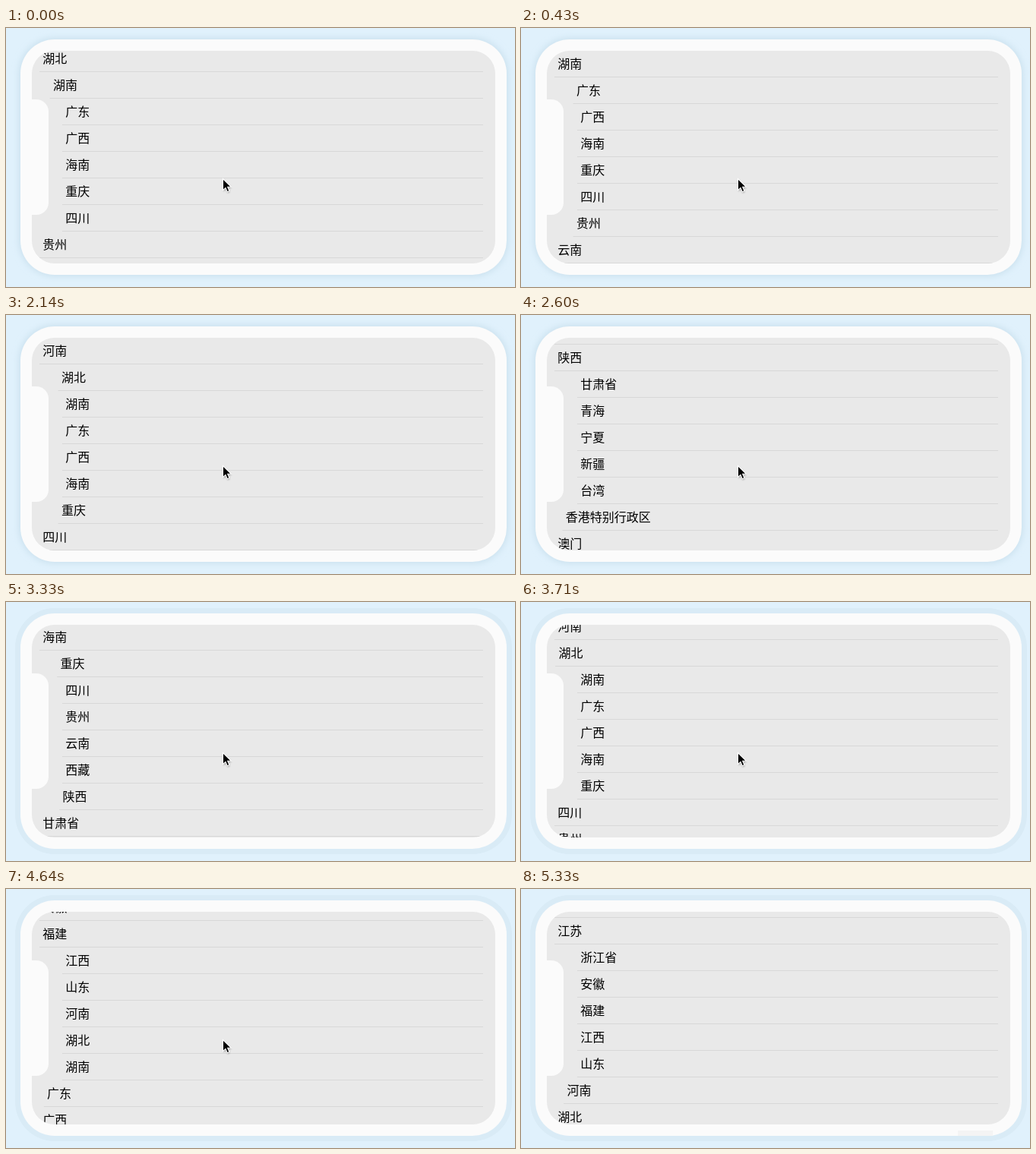
These frames come from a looping animation (670x341 px, 5710 ms). An HTML page:

```html
<!DOCTYPE html>
<html lang="zh-CN">
<head>
<meta charset="utf-8">
<title>List scrolling around a notch</title>
<style>
  html, body { margin: 0; width: 100%; height: 100%; overflow: hidden; background: #e0f1fc; }
  svg { display: block; width: 670px; height: 341px; }
  text { font: 16px "Noto Sans CJK SC", "Noto Sans CJK", sans-serif; fill: #000; }
</style>
</head>
<body>
<svg viewBox="0 0 670 341">
  <defs>
    <clipPath id="screen"><rect x="34" y="30" width="610" height="280" rx="30"/></clipPath>
    <filter id="soft" x="-10%" y="-10%" width="120%" height="120%"><feGaussianBlur stdDeviation="4.5"/></filter>
    <filter id="tiny" x="-50%" y="-50%" width="200%" height="200%"><feGaussianBlur stdDeviation="1"/></filter>
    <path id="arrow" d="M0 0V15.2L3.5 11.9L5.8 17.2L8.5 16L6.2 10.8H11Z"/>
  </defs>
  <rect id="glow" x="17" y="13" width="644" height="314" rx="47" fill="#cbe1ee" filter="url(#soft)"/>
  <rect id="ring" x="12" y="8" width="654" height="324" rx="52" fill="#d9ebf6"/>
  <rect x="19" y="15" width="640" height="310" rx="45" fill="#fbfbfb"/>
  <g clip-path="url(#screen)">
    <rect x="34" y="30" width="610" height="280" fill="#e9e9e9"/>
    <g id="list"></g>
    <path d="M34 94H40A16 16 0 0 1 56 110V230A16 16 0 0 1 40 246H34Z" fill="#fbfbfb"/>
  </g>
  <rect id="patch" x="575" y="318" width="46" height="7" fill="#f4f4f4"/>
  <g id="cursor">
    <use href="#arrow" x="0.5" y="1.5" opacity=".35" filter="url(#tiny)"/>
    <use href="#arrow" fill="#000" stroke="#fff" stroke-width="1.1"/>
  </g>
</svg>
<script>
const LOOP = 5710, PITCH = 35;
const names = ("上海 江苏 浙江省 安徽 福建 江西 山东 河南 湖北 湖南 广东 广西 海南 重庆 四川 " +
  "贵州 云南 西藏 陕西 甘肃省 青海 宁夏 新疆 台湾 香港特别行政区 澳门").split(" ");

// Each swipe: first and last step time, step count, scroll from and to, braking power.
const swipes = [
  { start: 210, end: 430, steps: 5, from: 205, to: 233, power: 2 },
  { start: 550, end: 610, steps: 2, from: 233, to: 236, power: 2 },
  { start: 1150, end: 1910, steps: 14, from: 236, to: 42, power: 3 },
  { start: 2090, end: 2720, steps: 12, from: 42, to: 547, power: 2.67 },
  { start: 3100, end: 3990, steps: 17, from: 547, to: 166, power: 3.46 },
  { start: 4130, end: 5330, steps: 22, from: 166, to: -55, power: 1.77 }
];

const byId = id => document.getElementById(id);
const clamp = (v, lo, hi) => Math.min(hi, Math.max(lo, v));
const show = (node, on) => node.setAttribute("visibility", on ? "visible" : "hidden");

function make(tag, attrs, parent) {
  const node = document.createElementNS("http://www.w3.org/2000/svg", tag);
  for (const key in attrs) node.setAttribute(key, attrs[key]);
  return parent.appendChild(node);
}

const rows = names.map(name => {
  const group = make("g", {}, byId("list"));
  make("text", { x: 48.3, y: 6 }, group).textContent = name;
  const line = make("rect", { x: 44, y: 17, height: 1, fill: "#d8d8d8" }, group);
  return { group, line };
});

function scrollAt(t) {
  let scroll = swipes[0].from;
  for (const s of swipes) {
    if (t < s.start) break;
    const step = Math.floor((t - s.start) / (s.end - s.start) * (s.steps - 1) + 0.2);
    const u = clamp((step + 1) / s.steps, 0, 1);
    const progress = 1 - Math.pow(1 - Math.pow(u, 1.3), s.power);
    scroll = s.from + (s.to - s.from) * progress;
  }
  return Math.round(scroll);
}

// Rows slide right to make room while they pass the notch.
const indentAt = y => clamp((103.2 - Math.abs(y - 169.5)) * 1.57, 0, 30);

function render(t) {
  const scroll = scrollAt(t);
  rows.forEach(({ group, line }, i) => {
    const y = (i - 1) * PITCH - scroll;
    const visible = y > 0 && y < 330;
    show(group, visible);
    if (!visible) return;
    const dx = indentAt(y);
    group.setAttribute("transform", `translate(${dx.toFixed(2)} ${y})`);
    line.setAttribute("width", (584 - dx).toFixed(2));
  });

  const crisp = t >= 2720;
  show(byId("glow"), !crisp);
  show(byId("ring"), crisp);
  show(byId("patch"), t >= 5330);

  const leave = clamp((t - 5000) / 330, 0, 1);
  const ease = leave * leave * (3 - 2 * leave);
  byId("cursor").setAttribute("transform", `translate(${285.5 + 310 * ease} ${198.5 + 146 * ease})`);
  show(byId("cursor"), leave < 1);
}

const origin = performance.now();
function tick() {
  render((performance.now() - origin) % LOOP);
  requestAnimationFrame(tick);
}
render(0);
requestAnimationFrame(tick);
</script>
</body>
</html>
```
